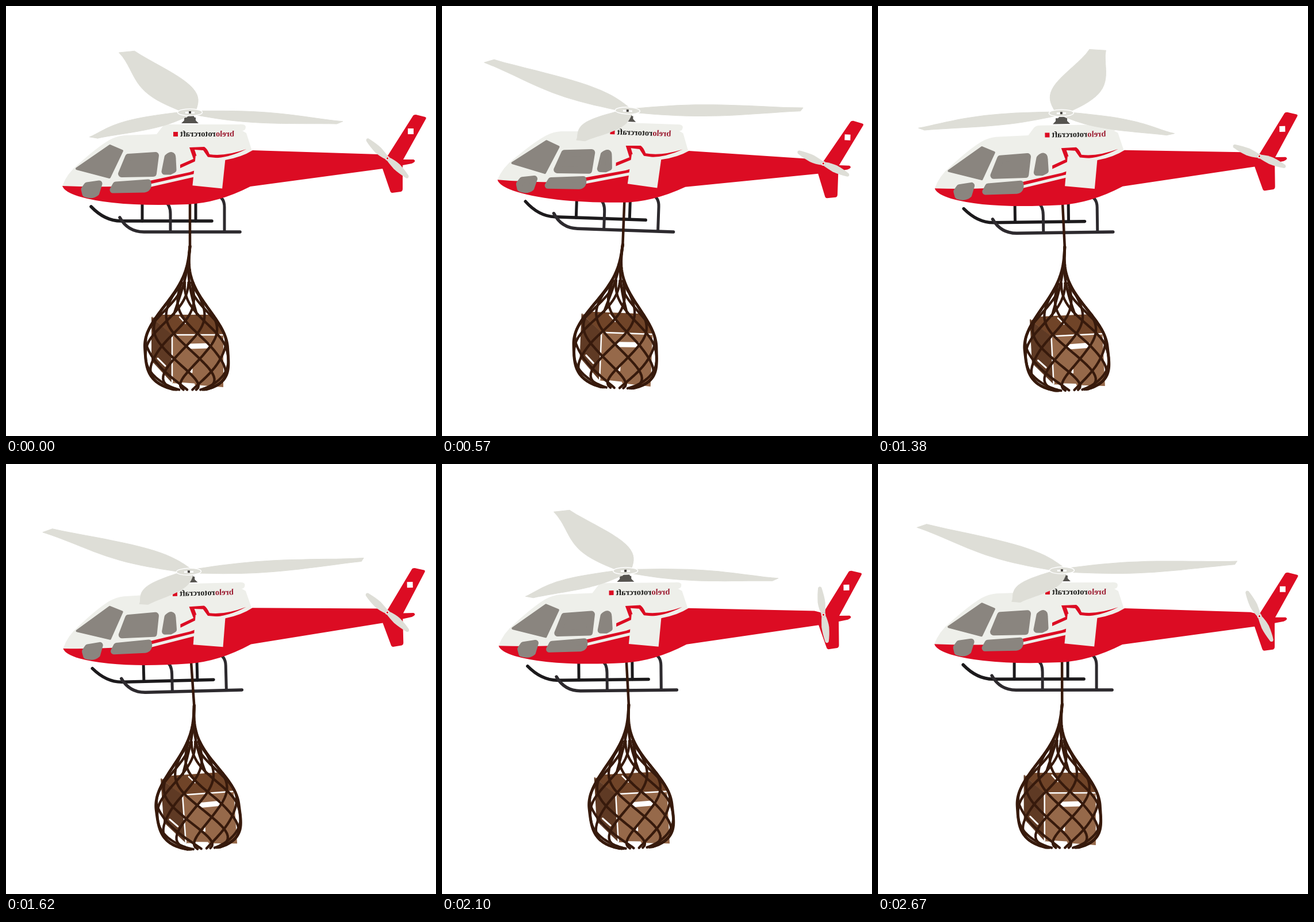
Recreate the animation shown at these times as an HTML page with a canvas. Size 748x748 px, loop 2700 ms.

```html
<!DOCTYPE html>
<html lang="en">
<head>
<meta charset="utf-8">
<title>Helicopter with cargo net</title>
<style>
  html, body { margin: 0; height: 100%; overflow: hidden; background: #fff; }
  canvas { display: block; }
</style>
</head>
<body>
<canvas id="stage" width="748" height="748"></canvas>
<script>
const ctx = document.getElementById('stage').getContext('2d');
const LOOP = 2700, STEP = 30, RAD = Math.PI / 180;
const RED = '#dc0c23', WHITE = '#eeefea', GLASS = '#8a857f', BLADE = '#deded7', ROPE = '#371a0c';

// Key poses in degrees, joined by a smooth periodic curve
const poses = [
  { time: 0, tilt: 0, swing: 0 },
  { time: 570, tilt: 2, swing: 2.25 },
  { time: 1050, tilt: 1.75, swing: 1.66 },
  { time: 1380, tilt: -.8, swing: -2.84 },
  { time: 1650, tilt: -1.5, swing: -4 },
  { time: 2100, tilt: -.6, swing: -3.1 }
];

function pose(part, t) {
  const n = poses.length;
  const time = i => poses[(i + n) % n].time + Math.floor(i / n) * LOOP;
  const value = i => poses[(i + n) % n][part];
  const slope = i => (value(i + 1) - value(i - 1)) / (time(i + 1) - time(i - 1));
  let i = n - 1;
  while (time(i) > t) i--;
  const span = time(i + 1) - time(i), p = (t - time(i)) / span, q = 1 - p;
  return value(i) * q * q * (1 + 2 * p) + value(i + 1) * p * p * (3 - 2 * p)
    + span * p * q * (slope(i) * q - slope(i + 1) * p);
}

// Path through point(s) for s from start to end
function trace(point, start, end, steps = 40) {
  const path = new Path2D();
  for (let i = 0; i <= steps; i++) path.lineTo(...point(start + (end - start) * i / steps));
  return path;
}

const asPath = shape => typeof shape === 'string' ? new Path2D(shape) : shape;

function fill(shape, color) {
  ctx.fillStyle = color;
  ctx.fill(asPath(shape));
}

function line(shape, color, width) {
  ctx.strokeStyle = color;
  ctx.lineWidth = width;
  ctx.stroke(asPath(shape));
}

function pane(shape, rounding) {
  fill(shape, GLASS);
  line(shape, GLASS, rounding);
}

function turned(x, y, degrees, draw) {
  ctx.save();
  ctx.translate(x, y);
  ctx.rotate(degrees * RAD);
  ctx.translate(-x, -y);
  draw();
  ctx.restore();
}

function drawSkids() {
  const far = '#1c1a1c', near = '#2d2a2e';
  line('M237 343V374M330 336V374', far, 5);
  line('M148 349Q172 374 200 374H358', far, 5.5);
  line('M276 340Q286 345 286 362V391M366 329Q380 333 380 350V391', near, 5);
  line('M198 368Q212 393 240 393H407', near, 5.5);
}

function drawBody() {
  fill('M98 313Q106 291 126 275Q158 246 180 233Q193 226 206 225L262 223L272 210Q275 206 284 206H405' +
    'Q416 205 417 210Q417 217 411 217L418 221L428 252L420 314Q330 335 240 330L140 326Z', WHITE);
  fill('M98 313Q145 315 190 314L250 304L320 289L381 268Q410 263 429 251L648 258L663 262L708 191' +
    'Q709 189 713 189L729 193Q732 194 730 197L691 267H709Q715 270 706 274L690 277V318' +
    'Q690 322 687 323L672 325Q669 325 668 321L655 283L425 314Q368 343 315 345Q190 350 126 331Q101 323 98 313Z', RED);
  line('M252 312L335 293', WHITE, 5);
  fill('M319 246L345 245Q350 248 354 258Q381 262 418 249Q382 267 352 264L343 251L328 250L334 268L303 282V276L326 266Z', RED);
  turned(353, 289, 6, () => {
    ctx.fillStyle = WHITE;
    ctx.fillRect(327, 263, 52, 52);
  });

  pane('M123 283L181 243L202 252L180 298Z', 4);
  pane('M201 292L213 263L260 260L256 291Z', 12);
  pane('M276 288L281 263Q290 255 290 265L291 285L285 288Z', 11);
  pane('M136 319L141 312L162 309L157 325Q150 331 138 327Z', 11);
  pane('M186 320L191 311L247 307Q249 318 240 319Z', 11);

  ctx.fillStyle = '#fff';
  ctx.fillRect(699, 213, 10, 10);
  ctx.fillStyle = RED;
  ctx.fillRect(291, 219, 8, 8);
  drawName();
}

function drawName() {
  ctx.save();
  ctx.translate(397, 227);
  ctx.scale(-1, 1);
  ctx.font = 'bold 14.6px "Liberation Serif", serif';
  ctx.fillStyle = '#9b1b30';
  ctx.fillText('brelo', 0, 0);
  const offset = ctx.measureText('brelo').width;
  ctx.fillStyle = '#1d1d1b';
  ctx.fillText('rotorcraft', offset, 0);
  ctx.restore();
}

// Blade edge in the rotor plane: s runs from -1 (tip) over the hub to 1 (tip)
function bladeEdge(s) {
  const along = Math.abs(s), half = .035 + .093 * Math.sin(Math.PI * along ** .85) ** 1.3;
  return [along * 1.01, Math.sign(s) * half - .03 * along ** 3];
}

function drawRotor(angle) {
  fill('M318 190H326L328 194H330V199L335 204H305L310 199V194H314Z', '#55534f');
  for (let blade = 0; blade < 3; blade++) {
    const c = Math.cos((angle + blade * 120) * RAD), s = Math.sin((angle + blade * 120) * RAD);
    const project = position => {
      const [along, across] = bladeEdge(position);
      const x = along * c - across * s, y = along * s + across * c, depth = 1 + .313 * y;
      return [320 + 288 * x / depth, 185 + 75 * y / depth];
    };
    const shape = trace(project, -1, 1);
    shape.closePath();
    fill(shape, BLADE);
    line(shape, BLADE, 1);
  }
  const hub = new Path2D();
  hub.ellipse(320, 185, 21.5, 6, 0, 0, 7);
  fill(hub, BLADE);
  line(hub, '#fff', 1.5);
  fill('M312 184H328V187H312Z', '#fff');
  fill('M318 183H322V187H318Z', '#45423f');
}

function drawTailRotor(angle) {
  for (const half of [0, 180]) {
    turned(663.5, 265, angle + half, () =>
      fill('M663 262Q676 258 686 258Q700 259 711 262Q715 265 711 268Q695 271 684 271Q674 270 663 268Z', BLADE));
  }
  const hub = new Path2D();
  hub.arc(663.5, 265, 3.5, 0, 7);
  fill(hub, '#fff');
  line(hub, '#c9c8c1', 1);
  fill('M662 263.5H665V266.5H662Z', RED);
}

// Point on the front of the net: u from knot to bottom, degrees around the bag
function netPoint(u, degrees) {
  const radius = u < .7
    ? 72 * Math.sin(u / .7 * Math.PI / 2) ** 3
    : 72 * Math.sqrt(1 - ((u - .7) / .3) ** 4);
  return [320 - 8 * Math.sin(Math.PI * u) + radius * Math.sin(degrees * RAD), 418 + 252 * u];
}

function drawNet() {
  const TOP = .25, TWIST = 205, GAP = 36;
  for (const side of [-1, 1]) {
    line(trace(u => netPoint(u, side * 90), 0, 1, 80), ROPE, 5);
    line(trace(u => netPoint(u, side * 25), 0, .47), ROPE, 4.3);
    for (let first = -234; first < 90; first += GAP) {
      const start = Math.max(TOP, TOP + (-90 - first) / TWIST);
      const end = Math.min(.99, TOP + (90 - first) / TWIST);
      if (start < end) line(trace(u => netPoint(u, side * (first + TWIST * (u - TOP))), start, end), ROPE, 4.3);
    }
  }
}

function drawLoad() {
  fill('M253 541L267 537H363L379 572H288Z', '#704428');
  fill('M253 541L289 572L290 657L253 617Z', '#5f3a24');
  fill('M289 572H378V663L290 656Z', '#96694a');
  line('M256 541L266 538M302 541L312 552M289 572H378M289 573V655', '#fff', 2.5);
  line('M264 613L277 626M263 623L277 637M323 630V637H317M300 656L327 658', '#fff', 3);
  line('M317 592L353 591', '#fff', 9);
  line('M320 341V420', ROPE, 4.5);
  drawNet();
}

function draw() {
  const step = Math.floor(performance.now() % LOOP / STEP), t = step * STEP;
  const tilt = pose('tilt', t);
  ctx.clearRect(0, 0, 748, 748);
  ctx.lineCap = ctx.lineJoin = 'round';
  turned(404, 265, tilt, () => {
    drawSkids();
    turned(320, 343, pose('swing', t) - tilt, drawLoad);
    drawBody();
    drawTailRotor(43 - 20 * step);
    drawRotor(24 * step - 103.5);
  });
  requestAnimationFrame(draw);
}
draw();
</script>
</body>
</html>
```
